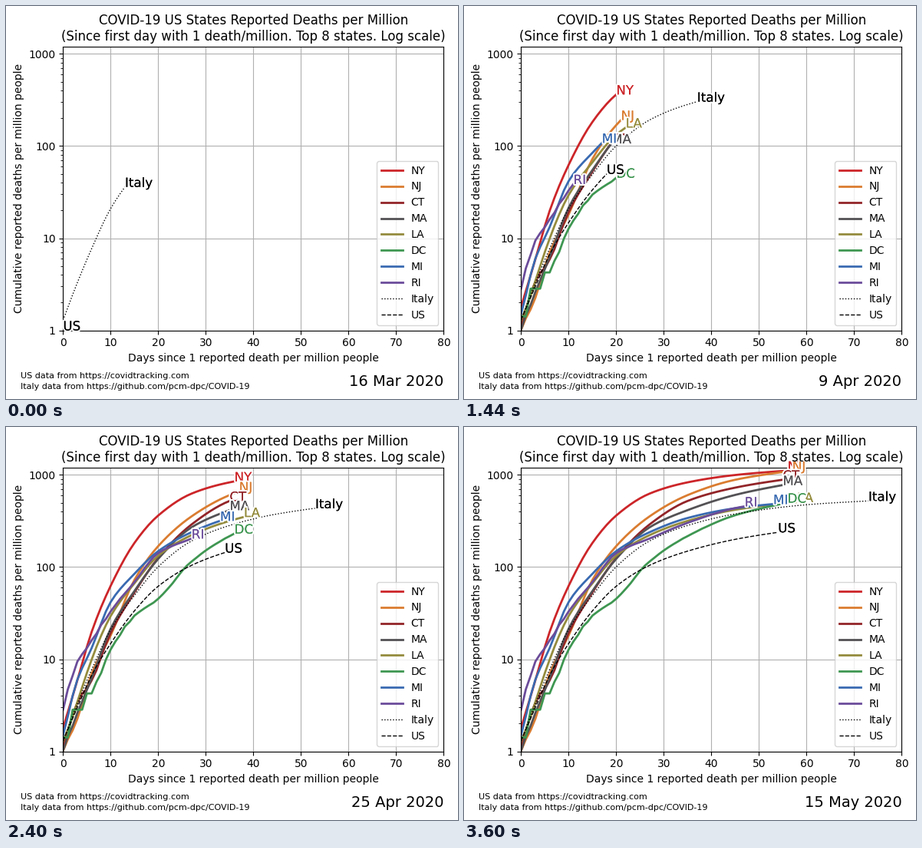
A matplotlib script for the animation above (6060 ms loop, 589 px wide and 512 px high).

```python
import numpy as np
import matplotlib.pyplot as plt
from matplotlib.animation import FuncAnimation
from matplotlib.patheffects import Normal, withStroke

W, H, DPI = 589, 512, 100
MARGIN = 10
STEP_MS, FRAMES, LAST_DAY = 60, 101, 60

plt.rcParams["font.family"] = "DejaVu Sans"
fig = plt.figure(figsize=(W / DPI, H / DPI), dpi=DPI, facecolor="white")
ax = fig.add_axes([0, 0, 1, 1])
ax.set_yscale("log")
ax.set_xlim(0, 80)
ax.set_ylim(1, 1200)
ax.yaxis.set_major_formatter("{x:g}")
ax.grid(True)
ax.set_title("COVID-19 US States Reported Deaths per Million\n"
             "(Since first day with 1 death/million. Top 8 states. Log scale)")
ax.set_xlabel("Days since 1 reported death per million people")
ax.set_ylabel("Cumulative reported deaths per million people")


def place(left):
    ax.set_position([left / W, 89.45 / H, 496 / W, 369.6 / H])


# Shift the axes until the y label sits exactly on the left margin.
place(74.2)
label_left = ax.yaxis.get_tightbbox(fig.canvas.get_renderer()).x0
left = 74.2 + MARGIN - label_left
place(left)

fig.text(19 / W, 27.05 / H, "US data from https://covidtracking.com", fontsize=8)
fig.text(19 / W, 12.65 / H,
         "Italy data from https://github.com/pcm-dpc/COVID-19", fontsize=8)
date = fig.text((left + 496) / W, 17.45 / H, "", fontsize=14, ha="right")

# Days at which every curve is pinned; growth in between is smooth.
KEY_DAYS = np.array([0, 3, 6, 10, 15, 20, 27, 35, 45, 60, 75])


def smooth(xs, ys, x):
    """Monotone cubic through rising points (xs, ys), evaluated at x."""
    h = np.diff(xs)
    s = np.diff(ys) / h
    w1, w2 = 2 * h[1:] + h[:-1], h[1:] + 2 * h[:-1]
    inner = (w1 + w2) / (w1 / s[:-1] + w2 / s[1:])
    m = np.concatenate([s[:1], inner, s[-1:]])
    i = np.clip(np.searchsorted(xs, x, side="right") - 1, 0, len(h) - 1)
    t = (x - xs[i]) / h[i]
    return ((1 + 2 * t) * (1 - t) ** 2 * ys[i] + t * (1 - t) ** 2 * h[i] * m[i]
            + t * t * (3 - 2 * t) * ys[i + 1] + t * t * (t - 1) * h[i] * m[i + 1])


class Region:
    """A growing line with a label at its tip; lag is the day it starts."""

    def __init__(self, name, color, lag, millions, rates, style="-", width=2):
        self.lag, self.always = lag, width == 1
        self.x = np.arange(LAST_DAY - lag + 1)
        rate = np.exp(smooth(KEY_DAYS[:len(rates)], np.log(rates), self.x))
        # Deaths are whole numbers, so small regions climb in steps.
        self.y = np.round(rate * millions) / millions
        self.line, = ax.plot([], [], style, color=color, lw=width, label=name)
        halo = withStroke(linewidth=3, foreground="w")
        self.label = ax.text(0, 1, name, color=color, fontsize=12,
                             path_effects=[halo, Normal()])

    def show(self, day):
        n = day - self.lag
        shown = max(n + 1, 0)
        self.line.set_data(self.x[:shown], self.y[:shown])
        self.label.set_position((n, self.y[n]) if shown else (0, 1))
        self.label.set_visible(shown > 0 or self.always)


regions = [
    Region("NY", "#CC2529", 4, 19.45,
           [1.8, 5.9, 19.8, 62.6, 183, 363, 627, 831, 998, 1155]),
    Region("NJ", "#DA7C30", 3, 8.88,
           [1.0, 2.25, 7, 18.1, 72.7, 169, 355, 604, 886, 1170]),
    Region("CT", "#922428", 5, 3.565,
           [1.1, 3.4, 5.9, 19.4, 53, 126, 290, 522, 728, 970]),
    Region("MA", "#535154", 5, 6.893,
           [1.05, 2.6, 6.2, 21.5, 55, 123, 270, 415, 607, 870]),
    Region("LA", "#948B3D", 2, 4.649,
           [1.3, 3.4, 9.9, 29.5, 66.7, 133, 222, 317, 419, 523]),
    Region("DC", "#3E9651", 4, 0.706,
           [1.4, 2.8, 4.3, 12.7, 29.7, 45.3, 115, 217, 365, 555]),
    Region("MI", "#396AB1", 7, 9.987,
           [1.5, 6, 13.2, 41.8, 84.6, 149, 239, 341, 435, 522]),
    Region("RI", "#6B4C9A", 13, 1.059,
           [2.8, 9.4, 16, 33, 69, 142, 204, 302, 436, 570]),
    Region("Italy", "black", -13, 60.36,
           [1.3, 3.3, 7.7, 21, 49.3, 100.7, 192, 283, 377, 475, 530], ":", 1),
    Region("US", "black", 6, 328.2,
           [1.3, 3, 6.7, 14.8, 33.5, 62, 104.5, 149, 200, 265], "--", 1),
]
ax.legend(loc="lower right")


def date_text(day):
    d = 16 + day
    for month, length in (("Mar", 31), ("Apr", 30), ("May", 31)):
        if d <= length:
            return f"{d} {month} 2020"
        d -= length


def update(frame):
    day = min(frame, LAST_DAY)
    for region in regions:
        region.show(day)
    date.set_text(date_text(day))
    return []


anim = FuncAnimation(fig, update, frames=FRAMES, interval=STEP_MS,
                     init_func=lambda: update(0), repeat=True, repeat_delay=0)
plt.show()
```
